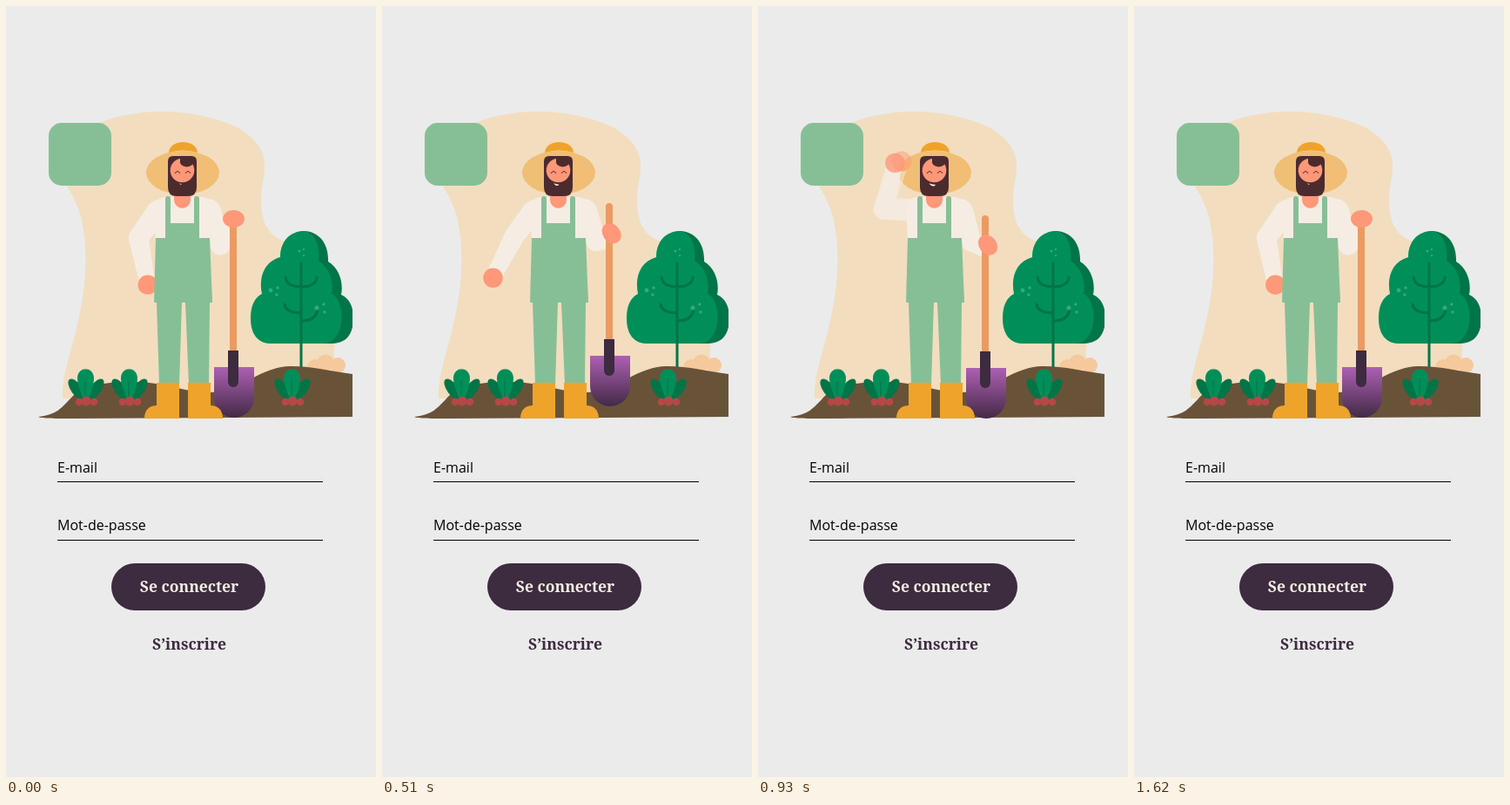
Recreate the animation shown at these times as an HTML page. Size 425 by 884 pixels, loop 2460 ms.

```html
<!DOCTYPE html>
<html lang="fr">
<head>
<meta charset="utf-8">
<title>Connexion</title>
<style>
  html, body { margin: 0; width: 100%; height: 100%; overflow: hidden; background: #ebebeb; }
  svg { display: block; width: 100%; height: 100%; }
  .label { font: 16px "Open Sans", "Noto Sans", sans-serif; }
  .action { font: bold 17.5px "Noto Serif", serif; text-anchor: middle; }
  .light { fill: #008f59; }
  .dark { fill: #007548; }
  .vein { fill: none; stroke: #007548; stroke-width: 3; stroke-linecap: round; }
  .spots { fill: #35a878; }
  .shirt { fill: #f5ede4; }
  .skin { fill: #ff9779; }
  .cloth { fill: #86bf96; }
  .boot { fill: #efa32b; }
  .hair { fill: #4b2b2e; }
  .plum { fill: #3d2b3f; }
</style>
</head>
<body>
<svg viewBox="0 0 425 884">
  <defs>
    <linearGradient id="steel" x2="0" y2="1">
      <stop stop-color="#ad60b3"/>
      <stop offset="1" stop-color="#432a46"/>
    </linearGradient>
    <clipPath id="edge"><path d="M0 0H398V884H0Z"/></clipPath>
    <g id="radish">
      <g class="dark">
        <ellipse cx="-11" cy="-14.5" rx="6.3" ry="14" transform="rotate(-35 -11 -14.5)"/>
        <ellipse cx="11" cy="-14.5" rx="6.3" ry="14" transform="rotate(35 11 -14.5)"/>
      </g>
      <path class="light" d="M-2 0C-7-14-10-20-10-28C-9-41 8-41 9-28C9-20 6-12 2 0Z"/>
      <path class="vein" style="stroke-width:1" d="M-1-2V-25M-3-4L-13-18M2-4L12-18"/>
      <g fill="#b54747">
        <circle cx="-8" r="4.3"/><circle cx="9" r="4.3"/><circle cy="-1" r="5.5"/>
      </g>
    </g>
  </defs>

  <path fill="#f3ddbf" d="M180 121C215 121 250 130 272 143C292 156 298 172 297 187C296 200 292 212 293 228C294 252 305 266 322 270C370 280 380 330 377 400V450H65C64 425 74 400 82 365C93 320 95 270 84 235C78 215 62 200 62 180C64 145 120 121 180 121Z"/>
  <rect class="cloth" x="49" y="134" width="72" height="72" rx="15"/>

  <g clip-path="url(#edge)">
    <g fill="#f5c99b">
      <circle cx="355" cy="414" r="9"/><circle cx="367" cy="409" r="9.5"/><circle cx="381" cy="412" r="9"/>
    </g>
    <path class="dark" d="M342 258C358 258 371 271 370 293C382 300 388 316 385 331C394 335 399 344 399 358C399 376 391 387 375 387H340Z"/>
    <path class="light" d="M303 387C288 386 281 375 281 358C281 343 286 334 294 330C290 310 297 293 315 288C315 268 328 258 342 258C355 260 361 275 359 292C371 300 377 315 374 330C390 338 391 384 366 387Z"/>
    <path class="vein" d="M339 295V415M321 311C322 319 328 322 339 322M357 311C356 319 350 322 339 322M320 342C321 349 328 352 339 352M358 347C357 357 350 361 339 361"/>
    <g class="spots">
      <circle cx="337" cy="281" r="1.5"/><circle cx="342" cy="279" r="1.2"/><circle cx="342" cy="286" r="1.2"/>
      <circle cx="304" cy="326" r="2.4"/><circle cx="312" cy="323" r="1.7"/><circle cx="311" cy="331" r="1.7"/>
      <circle cx="357" cy="346" r="2.6"/><circle cx="365" cy="342" r="1.7"/><circle cx="366" cy="351" r="1.7"/>
    </g>
    <path fill="#685339" d="M37 471C60 468 62 462 78 446C92 433 120 431 150 431C185 432 205 443 235 443C275 440 290 414 327 413C350 413 370 418 398 422V471L75 473C60 473 40 473 37 471Z"/>
  </g>
  <use href="#radish" x="92" y="454"/>
  <use href="#radish" x="142" y="454"/>
  <use href="#radish" x="329" y="454"/>

  <path id="rightArm" class="shirt"/>
  <g id="shovel">
    <rect x="257" y="239" width="8" height="165" rx="4" fill="#ec9a61"/>
    <path fill="url(#steel)" d="M239 414H285V449A23 23 0 0 1 239 449Z"/>
    <path class="plum" d="M255 395H267V431A6 6 0 0 1 255 431Z"/>
  </g>
  <ellipse id="rightHand" class="skin" rx="12.5" ry="10"/>

  <ellipse cx="203" cy="191" rx="42" ry="25" fill="#f0be74"/>
  <path class="boot" d="M187 168C188 152 219 152 220 168Q203 163 187 168Z"/>
  <path class="shirt" d="M183 219C176 220 170 224 170 230L172 270H234L237 225C232 219 225 219 222 219Z"/>
  <path class="skin" d="M193 212H212V222A9.5 10 0 0 1 193 222Z"/>
  <path class="hair" d="M186 178Q186 172 192 172H213Q219 172 219 178V208Q219 218 209 218H196Q186 218 186 208Z"/>
  <circle class="skin" cx="202.5" cy="188.5" r="13.8"/>
  <path class="hair" d="M200 174H216V179C213 186 203 186 200 180Z"/>
  <path d="M194 192Q197 187 200 192M206 192Q209 187 212 192" fill="none" stroke="#4b2b2e"/>
  <path id="mouth" fill="#fff" d="M-7-1C-3 2 3 2 6 2C5 7-4 6-7-1Z"/>

  <g id="leftGhost"><path class="shirt"/><circle class="skin" r="11.5"/></g>
  <g id="leftArm"><path class="shirt"/><circle class="skin" r="11.2"/></g>

  <path class="cloth" d="M183 266V221A3 3 0 0 1 189 221V249H216V221A3 3 0 0 1 222 221V266H234L237 340H234L233 434H210L206 340H202L199 434H176L173 340H170L172 266Z"/>
  <path class="boot" d="M173 432H199V473H159C159 463 165 458 173 458ZM209 432H235V458C243 458 249 463 249 473H209Z"/>

  <g class="label">
    <text x="59" y="535">E-mail</text>
    <text x="59" y="601">Mot-de-passe</text>
  </g>
  <path d="M59 545H364V546H59ZM59 612H364V613H59Z"/>
  <rect class="plum" x="121" y="639" width="177" height="54" rx="27"/>
  <text class="action" x="210.5" y="672" fill="#f5ede4">Se connecter</text>
  <text class="action plum" x="210.5" y="738">S’inscrire</text>
</svg>
<script>
const LOOP = 2460, TICK = 30, STEP = 136, LAST_STEP = 12;
const STEEP = 4.25, SALUTE_MID = 6.57;

// Angles in degrees; grip is the hand's distance below the top of the handle.
const REST = {
  upper: 125.7, fore: 79, reach: 39,
  elbowX: 246, elbowY: 274, handX: 261.5, grip: 5, tilt: 0,
  lift: 0, smile: .22
};
// Each move pulls some values towards a new pose, half done at step "mid".
const MOVES = [
  { mid: 1.7, pose: { grip: 37, tilt: 52, smile: .6 } },
  { mid: 2.06, pose: { upper: 122, fore: 96, elbowX: 250, elbowY: 267, lift: 89, smile: 1.1 } },
  { mid: 3.6, pose: { upper: 129, fore: 121, reach: 36, elbowX: 245, elbowY: 270, handX: 264, grip: 34, lift: -1, smile: .35 } },
  { mid: SALUTE_MID, pose: { upper: 189.5, fore: 310, reach: 30, smile: .6 } },
  { mid: 10.5, pose: REST }
];

const $ = id => document.getElementById(id);
const eased = (step, mid) => 1 / (1 + Math.exp(STEEP * (mid - step)));
const polar = (x, y, angle, r) =>
  [x + r * Math.cos(angle * Math.PI / 180), y + r * Math.sin(angle * Math.PI / 180)];

function stepAt(t) {
  const shown = Math.floor(t / TICK) * TICK;
  return Math.min(LAST_STEP, Math.floor((shown + 35) / STEP));
}

function poseAt(step) {
  const pose = { ...REST };
  for (const { mid, pose: goal } of MOVES) {
    for (const key in goal) pose[key] += (goal[key] - pose[key]) * eased(step, mid);
  }
  return pose;
}

function taper(ax, ay, bx, by, wa, wb) {
  const len = Math.hypot(bx - ax, by - ay) || 1;
  const nx = (ay - by) / len / 2, ny = (bx - ax) / len / 2;
  return `M${ax + nx * wa} ${ay + ny * wa}L${bx + nx * wb} ${by + ny * wb}` +
    `L${bx - nx * wb} ${by - ny * wb}L${ax - nx * wa} ${ay - ny * wa}Z`;
}

const disc = (x, y, r) => `M${x - r} ${y}a${r} ${r} 0 1 0 ${2 * r} 0a${r} ${r} 0 1 0 ${-2 * r} 0Z`;

function sleeve(sx, sy, ex, ey, hx, hy) {
  const k = 1 - 6 / Math.hypot(hx - ex, hy - ey);
  const wx = ex + (hx - ex) * k, wy = ey + (hy - ey) * k;
  return disc(sx, sy, 11.5) + taper(sx, sy, ex, ey, 25, 23) +
    disc(ex, ey, 11.5) + taper(ex, ey, wx, wy, 23, 18);
}

function drawLeft(id, pose, turn, opacity) {
  const [arm, hand] = $(id).children;
  const [ex, ey] = polar(175, 234, pose.upper + turn, pose.reach);
  const [hx, hy] = polar(ex, ey, pose.fore + turn, 55);
  arm.setAttribute('d', sleeve(175, 234, ex, ey, hx, hy));
  hand.setAttribute('cx', hx);
  hand.setAttribute('cy', hy);
  $(id).setAttribute('opacity', opacity);
}

function draw(t) {
  const step = stepAt(t), pose = poseAt(step);
  const salute = eased(step, SALUTE_MID);
  const blur = 4 * salute * (1 - salute);
  drawLeft('leftArm', pose, 0, 1 - blur * .5);
  drawLeft('leftGhost', pose, 8, blur);

  const handY = 239 - pose.lift + pose.grip;
  $('rightArm').setAttribute('d',
    sleeve(234, 233, pose.elbowX, pose.elbowY, pose.handX + 2, handY + 8));
  $('rightHand').setAttribute('transform', `translate(${pose.handX} ${handY}) rotate(${pose.tilt})`);
  $('shovel').setAttribute('transform', `translate(0 ${-pose.lift})`);
  $('mouth').setAttribute('transform', `translate(200.5 203.5) scale(${pose.smile})`);
}

function tick() {
  draw(performance.now() % LOOP);
  requestAnimationFrame(tick);
}
tick();
</script>
</body>
</html>
```
